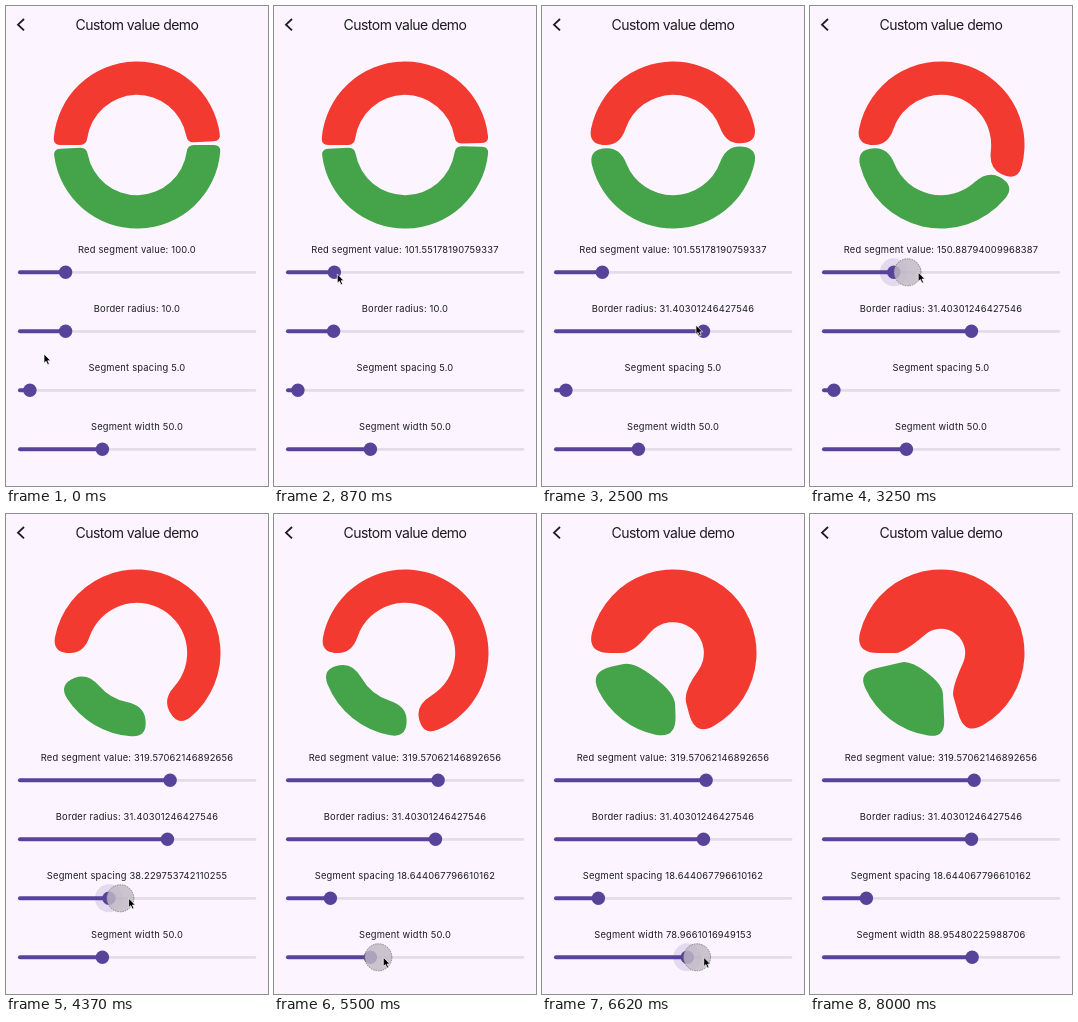
These frames come from a looping animation (262x480 px, 8380 ms). An HTML page:

```html
<!DOCTYPE html>
<html lang="en">
<head>
<meta charset="utf-8">
<title>Custom value demo</title>
<style>
  html, body { margin: 0; width: 100%; height: 100%; overflow: hidden; background: #fcf4fe; }
  svg { display: block; width: 262px; height: 480px; }
  text { font-family: Inter, Roboto, sans-serif; text-anchor: middle; fill: #1d1b20; }
  .title { font-size: 14px; letter-spacing: -.52px; }
  .label { font-size: 9.33px; letter-spacing: .2px; }
  .rest { stroke: #e4dce7; stroke-width: 2.7; stroke-linecap: round; }
  .active { stroke: #57439a; stroke-width: 4; stroke-linecap: round; }
  .thumb { fill: #57439a; }
  .halo { fill: #57439a; fill-opacity: .14; }
</style>
</head>
<body>
<svg viewBox="0 0 262 480">
  <path d="M18 13 L12 18.7 L18 24.4" fill="none" stroke="#1d1b20" stroke-width="1.8"/>
  <text class="title" x="131" y="24">Custom value demo</text>
  <path id="red" fill="#f23a30"/>
  <path id="green" fill="#45a349"/>
  <g id="sliders"></g>
  <circle id="touch" r="13.5" fill="#bfbac3" fill-opacity=".82" stroke="#77727c" stroke-width=".8" stroke-dasharray="1.5 1"/>
  <path id="cursor" d="M0 0 V9.2 L2.1 7.3 L3.7 10.8 L5.3 10.1 L3.8 6.7 H6.6 Z" fill="#000" stroke="#fff" stroke-width=".7"/>
</svg>
<script>
const LOOP = 8380, STEP = 125;
const CX = 131, CY = 139, OUTER = 83.5, SCALE = 2 / 3, GREEN = 100;
const LEFT = 12, TRACK = 238, TOP = 266.3, ROW = 59;
// In steps: the pointer leads the thumb, the red share trails it.
const CURSOR_LEAD = .8, TOUCH_LEAD = .4, RING_LAG = .5;
const $ = id => document.getElementById(id);

// Turning points of each value as [step, value]
const sliders = [
  { label: 'Red segment value: ', max: 500,
    keys: [[4, 100], [6, 101.55178190759337], [24, 101.55178190759337],
           [26, 150.88794009968387], [29, 319.57062146892656]] },
  { label: 'Border radius: ', max: 50, keys: [[15, 10], [20, 31.40301246427546]] },
  { label: 'Segment spacing ', max: 100,
    keys: [[32, 5], [35, 38.229753742110255], [36, 47], [40, 18.644067796610162]] },
  { label: 'Segment width ', max: 141,
    keys: [[44, 50], [47, 72], [49, 61.99246504616606], [50, 49], [54, 88.95480225988706]] }
];
const [red, radius, spacing, width] = sliders;

const holds = [
  { from: 0, to: 1, spot: [38, 348] },
  { from: 4, to: 7, slider: red },
  { from: 15, to: 20, slider: radius },
  { from: 24, to: 29, slider: red },
  { from: 32, to: 40, slider: spacing },
  { from: 44, to: 54, slider: width },
  { from: 57, to: 57, spot: [215, 455] }
];

const mix = (a, b, p) => a + (b - a) * p;
const smooth = p => p * p * (3 - 2 * p);

function valueAt({ keys }, k) {
  const i = keys.findIndex(key => key[0] >= k);
  if (i < 0) return keys[keys.length - 1][1];
  const [t, v] = keys[i];
  if (i === 0 || t === k) return v;
  const [t0, v0] = keys[i - 1];
  return mix(v0, v, (k - t0) / (t - t0));
}

const thumbX = (s, k) => LEFT + valueAt(s, k) / s.max * TRACK;
const grip = (h, k) => h.spot || [thumbX(h.slider, k) + 3, h.slider.y];

// Follows the held thumb, and eases from one hold to the next
function hand(k) {
  const i = holds.findIndex(h => k <= h.to);
  if (i < 0) return null;
  const next = holds[i], last = holds[i - 1];
  if (k >= next.from) return grip(next, k);
  const a = grip(last, last.to), b = grip(next, next.from);
  const p = smooth((k - last.to) / (next.from - last.to));
  return [mix(a[0], b[0], p), mix(a[1], b[1], p)];
}

function add(tag, attrs) {
  const el = document.createElementNS('http://www.w3.org/2000/svg', tag);
  for (const name in attrs) el.setAttribute(name, attrs[name]);
  return $('sliders').appendChild(el);
}

sliders.forEach((s, i) => {
  const y = s.y = TOP + i * ROW;
  s.text = add('text', { class: 'label', x: 131, y: y - 19.3 });
  add('line', { class: 'rest', x1: LEFT + 1, x2: LEFT + TRACK - 1, y1: y, y2: y });
  s.active = add('line', { class: 'active', x1: LEFT + 2, y1: y, y2: y });
  s.halo = add('circle', { class: 'halo', cy: y });
  s.thumb = add('circle', { class: 'thumb', r: 6.7, cy: y });
});

const point = (r, a) => `${(CX + r * Math.cos(a)).toFixed(2)} ${(CY + r * Math.sin(a)).toFixed(2)}`;

// Ring piece; each corner curve is tangent to both its edge and its arc
function segment(start, sweep, inner, corner) {
  const end = start + sweep;
  const c = Math.min(corner, (OUTER - inner) / 2, sweep * inner / 2);
  const o = c / OUTER, i = c / inner;
  const outCtl = OUTER / Math.cos(o), inCtl = Math.min(inner / Math.cos(i), inner + c);
  const arc = (r, cut, dir, a) =>
    `A${r} ${r} 0 ${sweep - 2 * cut > Math.PI ? 1 : 0} ${dir} ${point(r, a)}`;
  return `M${point(OUTER - c, start)} Q${point(outCtl, start)} ${point(OUTER, start + o)}` +
    arc(OUTER, o, 1, end - o) + `Q${point(outCtl, end)} ${point(OUTER - c, end)}` +
    `L${point(inner + c, end)} Q${point(inCtl, end)} ${point(inner, end - i)}` +
    arc(inner, i, 0, start + i) + `Q${point(inCtl, start)} ${point(inner + c, start)}Z`;
}

function drawRing(k) {
  const share = valueAt(red, k - RING_LAG);
  const corner = valueAt(radius, k) * SCALE;
  const inner = OUTER - valueAt(width, k) * SCALE;
  const gap = valueAt(spacing, k) * SCALE / ((OUTER + inner) / 2);
  const room = 2 * Math.PI - 2 * gap;
  const sweep = room * share / (share + GREEN);
  $('red').setAttribute('d', segment(Math.PI, sweep, inner, corner));
  $('green').setAttribute('d', segment(Math.PI + sweep + gap, room - sweep, inner, corner));
}

function drawSlider(s, k, held) {
  const v = valueAt(s, k), x = thumbX(s, k);
  s.text.textContent = s.label + (Number.isInteger(v) ? v.toFixed(1) : v);
  s.active.setAttribute('x2', x);
  s.thumb.setAttribute('cx', x);
  s.halo.setAttribute('cx', x);
  s.halo.setAttribute('r', held && held.slider === s ? Math.min(14, 7 * (k - held.from)) : 0);
}

function place(id, spot) {
  $(id).style.display = spot ? '' : 'none';
  if (spot) $(id).setAttribute('transform', `translate(${spot})`);
}

function render(k) {
  const held = holds.find(h => h.slider && k >= h.from && k < h.to);
  sliders.forEach(s => drawSlider(s, k, held));
  drawRing(k);
  place('touch', held && hand(k + TOUCH_LEAD));
  place('cursor', hand(k + CURSOR_LEAD));
}

function tick() {
  render(Math.floor((performance.now() % LOOP + 5) / STEP));
  requestAnimationFrame(tick);
}
tick();
</script>
</body>
</html>
```
